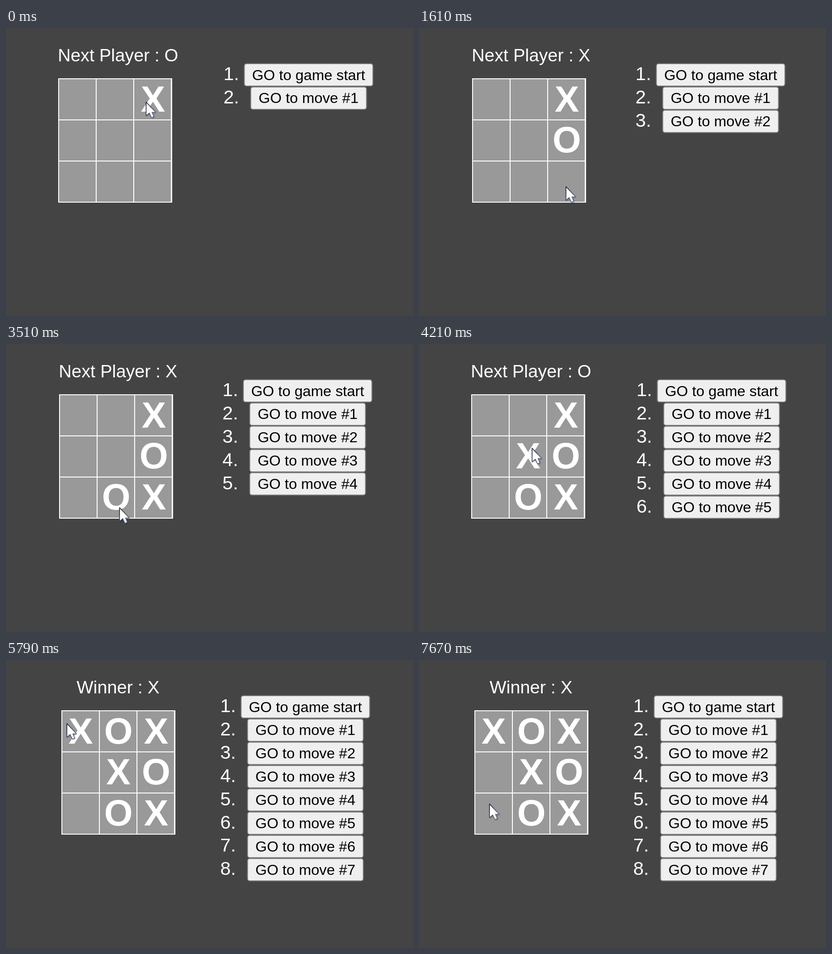
These frames come from a looping animation (889 px wide and 630 px high, 8000 ms). An HTML page with a canvas:

```html
<!DOCTYPE html>
<html lang="en">
<head>
<meta charset="utf-8">
<title>Tic-tac-toe</title>
<style>
  html, body { margin: 0; width: 100%; height: 100%; overflow: hidden; background: #444; }
  canvas { display: block; }
</style>
</head>
<body>
<canvas id="stage" width="889" height="630"></canvas>
<script>
const ctx = document.getElementById('stage').getContext('2d');
const LOOP = 8000;
const FRAME = 140;
const FONT = '"Liberation Sans", Arial, sans-serif';
const BOARD = 249;
const HEADING = 38.8;

const turnTimes = [0, 1280, 2010, 3510, 4210, 4930, 5790];

const pointerStart = { x: 305, y: 161 };
const trips = [
  { from: 960, to: 1610, x: 320, y: 346 },
  { from: 2190, to: 2370, x: 247, y: 357 },
  { from: 3650, to: 3930, x: 246, y: 227 },
  { from: 4360, to: 4650, x: 255, y: 152 },
  { from: 5080, to: 5380, x: 132, y: 138 },
  { from: 6340, to: 6800, x: 163, y: 242 },
  { from: 7490, to: 7670, x: 153, y: 314 }
];

function text(str, x, y, size, color, align = 'center', weight = 'normal') {
  ctx.font = `${weight} ${size}px ${FONT}`;
  ctx.textAlign = align;
  ctx.fillStyle = color;
  ctx.fillText(str, x, y);
}

function columnWidth(heading) {
  ctx.font = `${HEADING}px ${FONT}`;
  return Math.max(BOARD, ctx.measureText(heading).width);
}

// The players fill the columns from the right, down and up by turns.
function cellOf(turn) {
  const col = 2 - Math.floor(turn / 3);
  const step = turn % 3;
  return { col, row: col % 2 ? 2 - step : step };
}

// The pointer advances in even jumps, one per FRAME.
function pointerAt(t) {
  let { x, y } = pointerStart;
  for (const trip of trips) {
    if (t < trip.from) break;
    const jumps = end => Math.floor((end - trip.from) / FRAME) + 1;
    const done = jumps(Math.min(t, trip.to)) / jumps(trip.to);
    x += (trip.x - x) * done;
    y += (trip.y - y) * done;
  }
  return { x, y };
}

function drawBoard(left, count) {
  const pitch = (BOARD - 2) / 3;
  ctx.fillStyle = '#fff';
  ctx.fillRect(left, 110, BOARD, 272);
  ctx.fillStyle = '#999';
  for (let col = 0; col < 3; col++) {
    const x = left + 2 + Math.floor(col * pitch);
    for (let row = 0; row < 3; row++) ctx.fillRect(x, 112 + row * 90, 80, 88);
  }
  for (let i = 0; i < count; i++) {
    const { col, row } = cellOf(i);
    text(i % 2 ? 'O' : 'X', left + 1 + (col + 0.5) * pitch, 182.6 + row * 89.8, 80, '#fff', 'center', 'bold');
  }
}

function drawList(center, count) {
  for (let i = 0; i <= count; i++) {
    const y = 77 + i * 50.9;
    const width = i ? 255 : 283;
    text(`${i + 1}.`, center - 186, y + 37, 41, '#fff', 'left');
    ctx.beginPath();
    ctx.roundRect(center - width / 2 + 1, y + 1, width - 2, 49, 5);
    ctx.fillStyle = '#efefef';
    ctx.fill();
    ctx.lineWidth = 2;
    ctx.strokeStyle = '#767676';
    ctx.stroke();
    text(i ? `GO to move #${i}` : 'GO to game start', center, y + 36.5, 32.2, '#000');
  }
}

function drawPointer({ x, y }) {
  ctx.save();
  ctx.translate(x + 1, y + 1);
  const shape = new Path2D('M0 0V30L7 24L12 34L17 32L13 22.5H21Z');
  ctx.shadowColor = 'rgba(0,0,0,.4)';
  ctx.shadowBlur = 3;
  ctx.shadowOffsetX = ctx.shadowOffsetY = 1.5;
  ctx.fillStyle = '#fff';
  ctx.fill(shape);
  ctx.shadowColor = 'transparent';
  ctx.lineWidth = 1.6;
  ctx.lineJoin = 'round';
  const edge = ctx.createLinearGradient(0, 0, 20, 8);
  edge.addColorStop(0, '#14183a');
  edge.addColorStop(1, '#5c6684');
  ctx.strokeStyle = edge;
  ctx.stroke(shape);
  ctx.restore();
}

function draw(now) {
  const t = now % LOOP;
  const count = turnTimes.filter(time => time <= t).length;
  const won = count === turnTimes.length;
  const heading = won ? 'Winner : X' : `Next Player : ${count % 2 ? 'O' : 'X'}`;
  // A narrower heading pulls the board and the list together.
  const shift = (columnWidth('Next Player : O') - columnWidth(heading)) / 2;
  ctx.fillStyle = '#444';
  ctx.fillRect(0, 0, 889, 630);
  text(heading, 244.7, 73, HEADING, '#fff');
  drawBoard(Math.round(114 + shift), count);
  drawList(661 - shift, count);
  drawPointer(pointerAt(t));
}

const begin = performance.now();
function tick() {
  draw(performance.now() - begin);
  requestAnimationFrame(tick);
}
tick();
</script>
</body>
</html>
```
